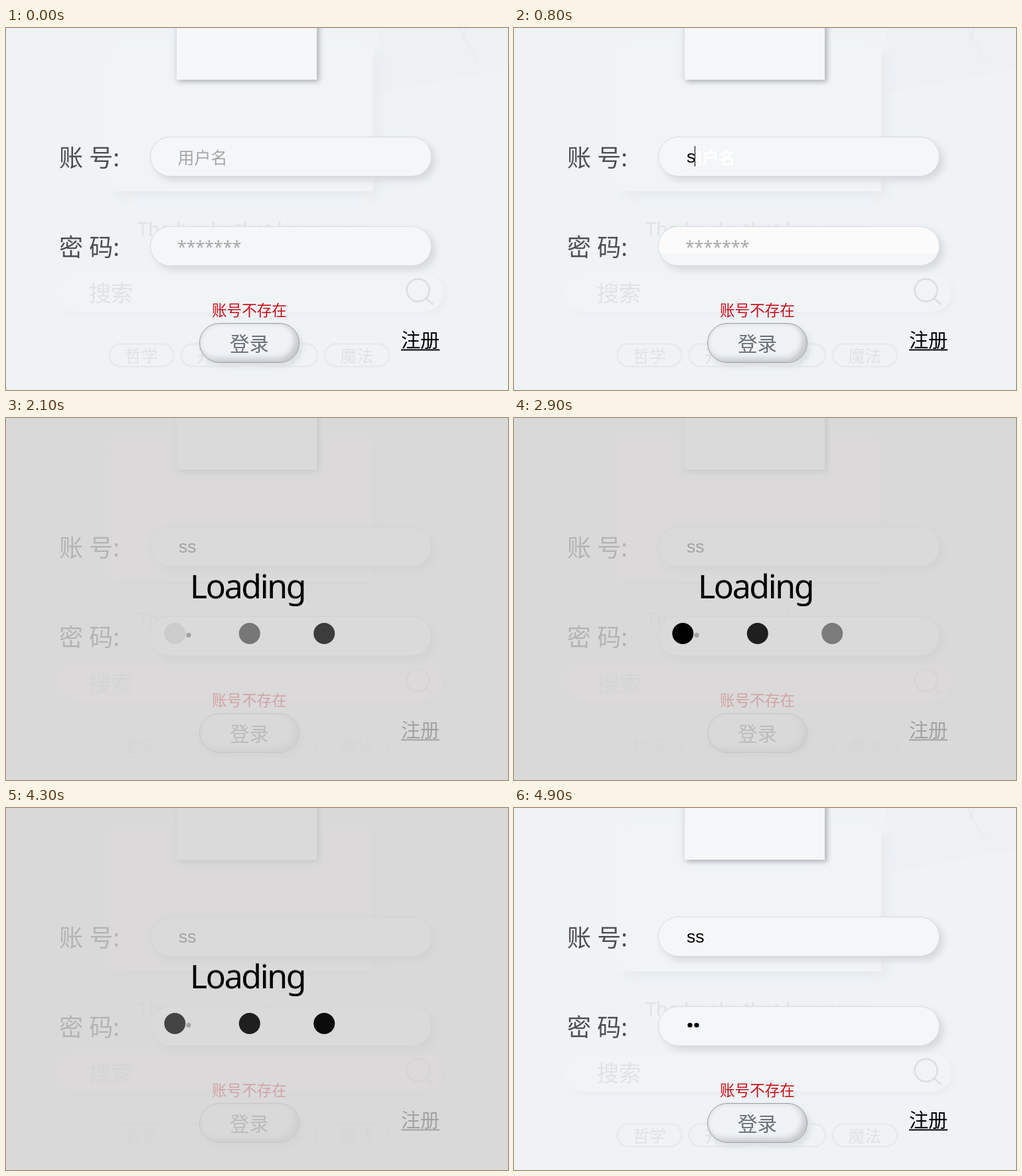
Animation, 756 px wide and 546 px high, one loop 5.6 s. Source, as an HTML page:

```html
<!DOCTYPE html>
<html lang="zh">
<head>
<meta charset="utf-8">
<style>
  html, body { margin: 0; width: 100%; height: 100%; overflow: hidden; background: #eff3f6; }
  #stage { position: absolute; left: 0; top: 0; width: 756px; height: 546px; overflow: hidden; }
  #stage > * { position: absolute; box-sizing: border-box; }
  svg { left: 0; top: 0; font-family: "Noto Sans", "Noto Sans CJK SC", sans-serif; white-space: pre; }
  .card { background: #f4f6f7; }
  #backCard { left: 157px; top: 30px; width: 396px; height: 216px; background: #f1f4f6;
    box-shadow: 9px 9px 14px #e7ebee, -4px -4px 10px #f2f5f7; }
  #topCard { left: 257px; top: -132px; width: 211px; height: 210px;
    box-shadow: 4px 3px 7px #b4b8bb, -3px 3px 8px #dde1e4; }
  .search { left: 75px; top: 369px; width: 584px; height: 59px; border-radius: 30px; background: #f1f4f5;
    box-shadow: 4px 4px 9px #e9edf0; }
  .field { left: 217px; width: 424px; height: 60px; border-radius: 30px; border: 1px solid #dadbdc;
    background: #f4f6f8; box-shadow: 6px 6px 11px #d5d9dc; }
  #account { top: 164px; }
  #password { top: 299px; }
  #password.lit { background: linear-gradient(#fbfbfb 40px, #f4f6f8 40px); }
  #login { left: 291px; top: 445px; width: 151px; height: 60px; border-radius: 30px; border: 1px solid #9c9d9f;
    background: #eff3f6; box-shadow: inset -6px -5px 10px #c3c7ca, inset 2px 2px 4px #e0e4e7, 4px 5px 10px #d9dee1; }
  #login.pressed { background: #d2d4d6;
    box-shadow: inset -5px -5px 10px #aeb0b2, inset 4px 4px 8px #bcbec0, 4px 5px 10px #d9dee1; }
  #veil { inset: 0; background: rgba(212, 210, 210, .77); }
  .pill { fill: none; stroke: #e7ebed; stroke-width: 3; }
  .faint { fill: #dfe3e5; font-weight: 300; }
  .typed { font: 26.67px "Liberation Sans", Arial, sans-serif; }
</style>
</head>
<body>
<div id="stage">
  <svg width="756" height="546">
    <path d="M560 0H756V62L565 97Z" fill="#edf1f4"/>
    <path d="M684 0L688 17L692 0M688 8L710 50" fill="none" stroke="#e2e7e9"/>
  </svg>
  <div class="card" id="backCard"></div>
  <div class="search"></div>
  <svg width="756" height="546">
    <text class="faint" x="198" y="314" font-size="29">The books that know you</text>
    <text class="faint" x="125" y="412" font-size="33">搜索</text>
    <g fill="none" stroke="#dcdfe2" stroke-width="2.6">
      <circle cx="620.5" cy="395.5" r="17"/>
      <path d="M632 407L643 417"/>
    </g>
    <g id="tags" class="faint" font-size="25" text-anchor="middle"></g>
  </svg>
  <div class="card" id="topCard"></div>
  <div class="field" id="account"></div>
  <div class="field" id="password"></div>
  <div id="login"></div>
  <svg width="756" height="546">
    <defs>
      <clipPath id="nameClip"><rect id="nameCut" y="170" width="120" height="50"/></clipPath>
      <clipPath id="passClip"><rect id="passCut" y="305" width="120" height="48"/></clipPath>
    </defs>
    <g font-size="36" fill="#4f4e53">
      <text x="80" y="209">账 号:</text>
      <text x="80" y="344">密 码:</text>
    </g>
    <g font-size="25">
      <g clip-path="url(#nameClip)"><text id="nameHint" x="258.5" y="205">用户名</text></g>
      <g clip-path="url(#passClip)"><text id="passHint" x="258" y="339">*******</text></g>
    </g>
    <path id="trail" stroke="#fff" fill="none"/>
    <text id="name" class="typed" x="260" y="203"></text>
    <g id="bullets"><circle cx="265" cy="327.5" r="3.6"/><circle cx="275" cy="327.5" r="3.6"/></g>
    <path id="caret" stroke="#000" fill="none"/>
    <text x="310" y="433.5" font-size="22.6" font-weight="300" fill="#c4101a">账号不存在</text>
    <text id="loginText" x="337" y="487" font-size="29.5">登录</text>
    <text x="595" y="482" font-size="29">注册</text>
    <path d="M595 485.5H653" stroke="#000" stroke-width="2"/>
  </svg>
  <div id="veil"></div>
  <svg id="loader" width="756" height="546">
    <text x="277" y="272" font-size="50" letter-spacing="-2.4">Loading</text>
    <circle cx="254.3" cy="325" r="16"/>
    <circle cx="366.8" cy="325" r="16"/>
    <circle cx="479.2" cy="325" r="16"/>
  </svg>
</div>
<script>
const LOOP = 5600, STEP = 100, PULSE_SPAN = 6000;
const $ = id => document.getElementById(id);
const show = (id, on) => { $(id).style.visibility = on ? 'visible' : 'hidden'; };

$('tags').innerHTML = ['哲学', '开发', '文学', '魔法'].map((word, i) => {
  const x = 155.5 + 108.2 * i;
  return `<rect class="pill" x="${x}" y="476.5" width="97" height="34" rx="17"/>
    <text x="${x + 48.5}" y="504">${word}</text>`;
}).join('');

// Each dot runs the same white/black pulse, 155 ms ahead of its left neighbour.
const pulses = [...document.querySelectorAll('#loader circle')].map((dot, i) => {
  const frames = [1950, 2950, 3850, 4885, 5885].map((time, k) => ({
    offset: (time - 155 * i) / PULSE_SPAN,
    fill: k % 2 ? '#000000' : '#fafafa',
    easing: 'ease'
  }));
  const pulse = dot.animate(frames, { duration: PULSE_SPAN, fill: 'both' });
  pulse.pause();
  return pulse;
});

function setHint(id, cutId, left, fade, visible, weight) {
  const grey = Math.round(166 + 89 * fade);
  const hint = $(id);
  hint.style.fill = `rgb(${grey},${grey},${grey})`;
  hint.style.fontWeight = fade === 1 ? 600 : weight;
  $(cutId).setAttribute('x', left);
  show(id, visible);
}

function caretPath(t) {
  if (t < 600 || t >= 2000) return '';
  if (t < 1300) return `M${t < 800 ? 260.5 : t < 1000 ? 272.5 : 287.5} 178V209`;
  return `M${t < 1500 ? 260.5 : t < 1600 ? 270.5 : 279.5} 313V345`;
}

function render(t) {
  const editing = t >= 600 && t < 2100;
  const loading = t >= 2100 && t < 4900;
  const pressed = t >= 2000 && t < 2100;
  const nameLength = t < 800 ? 0 : t < 1000 ? 1 : 2;
  const passLength = t < 1500 ? 0 : t < 1600 ? 1 : 2;

  setHint('nameHint', 'nameCut', [255, 273, 289][nameLength],
    t < 600 ? 0 : Math.min(1, (t - 500) / 300), t < 2100, 400);
  setHint('passHint', 'passCut', [255, 271, 280][passLength], t < 1300 ? 0 : 1, t < 2100, 300);
  $('name').textContent = 's'.repeat(nameLength);
  [...$('bullets').children].forEach((bullet, i) => {
    bullet.style.display = i < passLength ? '' : 'none';
  });
  $('caret').setAttribute('d', caretPath(t));
  $('trail').setAttribute('d', pressed ? 'M289.5 178V209M261.5 313V345M270.5 313V345' : '');
  $('password').classList.toggle('lit', editing);
  $('login').classList.toggle('pressed', pressed);
  $('loginText').style.fill = pressed ? '#fff' : '#6c7078';
  show('veil', loading);
  show('loader', loading);
  for (const pulse of pulses) pulse.currentTime = t;
}

const start = performance.now();
function tick() {
  const t = (performance.now() - start) % LOOP;
  render(Math.floor(t / STEP) * STEP);
  requestAnimationFrame(tick);
}
tick();
</script>
</body>
</html>
```
